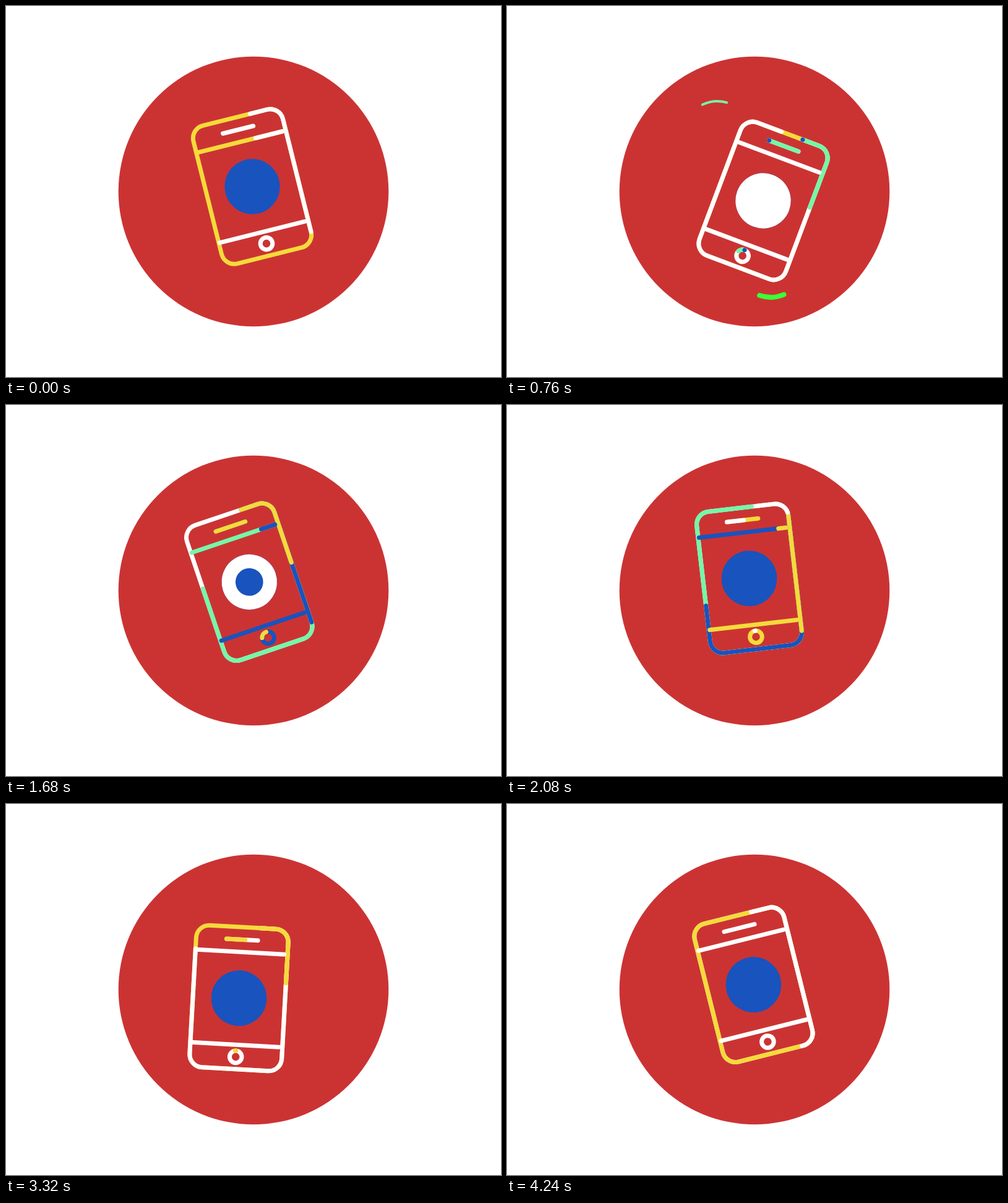
Recreate the animation shown at these times as an HTML page with a canvas. Size 800 by 600 pixels, loop 4280 ms.

```html
<!DOCTYPE html>
<html lang="en">
<head>
<meta charset="utf-8">
<title>Ringing phone</title>
<style>
html, body { margin: 0; width: 100%; height: 100%; overflow: hidden; background: #fff; }
canvas { display: block; width: 800px; height: 600px; }
</style>
</head>
<body>
<canvas id="stage" width="800" height="600"></canvas>
<script>
const ctx = document.getElementById('stage').getContext('2d');
const LOOP = 4280, STEP = 40, TAU = Math.PI * 2, RAD = Math.PI / 180;
const RED = '#cb3333', WHITE = '#ffffff', YELLOW = '#f5da3b',
      BLUE = '#1953be', MINT = '#74f7a8', LIME = '#3bff36';

const smooth = v => v * v * (3 - 2 * v);
const span = (v, a, b) => Math.max(0, Math.min(1, (v - a) / (b - a)));

// Turning points of the shake
const POSES = [
  { t: 0, x: 398, y: 292, turn: -14 },
  { t: 760, x: 414, y: 315, turn: 20.6 },
  { t: 1280, x: 395, y: 292, turn: -30.7 },
  { t: 2080, x: 391.5, y: 280.5, turn: -6.6 },
  { t: 2760, x: 406.5, y: 305, turn: 9.1 },
  { t: 3320, x: 376.5, y: 314, turn: 3.2 },
  { t: 4240, x: 398.4, y: 292.3, turn: -14 }
];

// Waves of colour running over the lines; mid is the pause on the right edge
const wave = (color, mid, rate = 1, lag = 0) => ({ color, mid, rate, lag });
const WAVES = [
  wave(WHITE, 0), wave(MINT, 1230), wave(BLUE, 1710), wave(YELLOW, 2130),
  wave(WHITE, 2760), wave(YELLOW, 3653, 1.5, 160), wave(WHITE, 4180, 1.5)
];

// Drawn share of each line at phase p of a wave
const PAUSE = 0.345;
const bodyShare = p => PAUSE * smooth(span(p, -960, -50)) +
  (1 - PAUSE) * (1 - (1 - span(p, 45, 900)) ** 1.4);
const topShare = p => span(p, -100, 90) ** 1.8;
const bottomShare = p => smooth(span(p, -330, -80));
const speakerShare = p => smooth(span(p, -960, -430));
const ringShare = p => span(p, -960, -200) ** 4;

const W = 74.5, H = 115, R = 21, RING = 9.8, DISC = 44.7;

const body = new Path2D();
body.moveTo(25, -H);
body.arcTo(W, -H, W, H, R);
body.arcTo(W, H, -W, H, R);
body.arcTo(-W, H, -W, -H, R);
body.arcTo(-W, -H, W, -H, R);
body.closePath();

const ring = new Path2D();
ring.arc(0, 95, RING, -TAU / 4, -TAU * 5 / 4, true);

function bar(x1, x2, y, share) {
  const path = new Path2D();
  path.moveTo(x1, y);
  path.lineTo(x2, y);
  return { path, length: Math.abs(x2 - x1), share };
}

const PARTS = [
  { path: body, length: 4 * (W + H - 2 * R) + TAU * R, share: bodyShare },
  bar(69, -73, -74.8, topShare),
  bar(69, -73, 75.4, bottomShare),
  { ...bar(-25.3, 25.3, -94.7, speakerShare), lags: true },
  { path: ring, length: TAU * RING, share: ringShare, lags: true }
];

// Loose strokes that slide along a small circle and shrink away
const SPARKS = [
  { color: MINT, x: 340, y: 209, angle: -95, width: 4, peak: 760 },
  { color: LIME, x: 426, y: 416, angle: 88, width: 8, peak: 760 },
  { color: YELLOW, x: 306, y: 274, angle: 128, width: 8, peak: 1106 }
];
const SPARK = { r: 55, half: 21, life: 200, drift: 35 };

function poseAt(t) {
  const i = POSES.findIndex(k => k.t > t);
  if (i < 0) return POSES[POSES.length - 1];
  const a = POSES[i - 1], b = POSES[i], e = smooth(span(t, a.t, b.t));
  const mix = key => a[key] + (b[key] - a[key]) * e;
  return { x: mix('x'), y: mix('y'), turn: mix('turn') };
}

function disc(x, y, r, color) {
  ctx.fillStyle = color;
  ctx.beginPath();
  ctx.arc(x, y, r, 0, TAU);
  ctx.fill();
}

function drawPart({ path, length, share, lags }, t) {
  let layers = [{ color: YELLOW, f: 1 }];
  for (const w of WAVES) {
    const f = share((t - w.mid) * w.rate - (lags ? w.lag : 0));
    if (f >= 1) layers = [];
    if (f > 0) layers.push({ color: w.color, f });
  }
  for (const { color, f } of layers) {
    ctx.strokeStyle = color;
    ctx.setLineDash(f < 1 ? [f * length, length * 2] : []);
    ctx.stroke(path);
  }
  ctx.setLineDash([]);
}

function drawSpark({ color, x, y, angle, width, peak }, t) {
  const d = (t - peak) / SPARK.life;
  if (Math.abs(d) >= 1) return;
  const half = SPARK.half * Math.sqrt(1 - d * d), mid = angle + SPARK.drift * d;
  ctx.strokeStyle = color;
  ctx.lineWidth = width;
  ctx.beginPath();
  ctx.arc(x, y, SPARK.r, (mid - half) * RAD, (mid + half) * RAD);
  ctx.stroke();
}

function draw(t) {
  ctx.fillStyle = WHITE;
  ctx.fillRect(0, 0, 800, 600);
  disc(400, 300, 218.3, RED);
  ctx.lineCap = 'round';
  SPARKS.forEach(s => drawSpark(s, t));

  const pose = poseAt(t);
  ctx.save();
  ctx.translate(pose.x, pose.y);
  ctx.rotate(pose.turn * RAD);
  ctx.lineWidth = 7;
  PARTS.forEach(part => drawPart(part, t));
  disc(0, 0, DISC, BLUE);
  const white = smooth(span(t, 320, 560)), blue = smooth(span(t, 1560, 1800));
  if (blue < 1) disc(0, 0, DISC * white, WHITE);
  disc(0, 0, DISC * blue, BLUE);
  ctx.restore();
}

const start = performance.now();
function tick() {
  const t = Math.max(0, performance.now() - start) % LOOP;
  draw(Math.floor(t / STEP) * STEP);
  requestAnimationFrame(tick);
}
tick();
</script>
</body>
</html>
```
